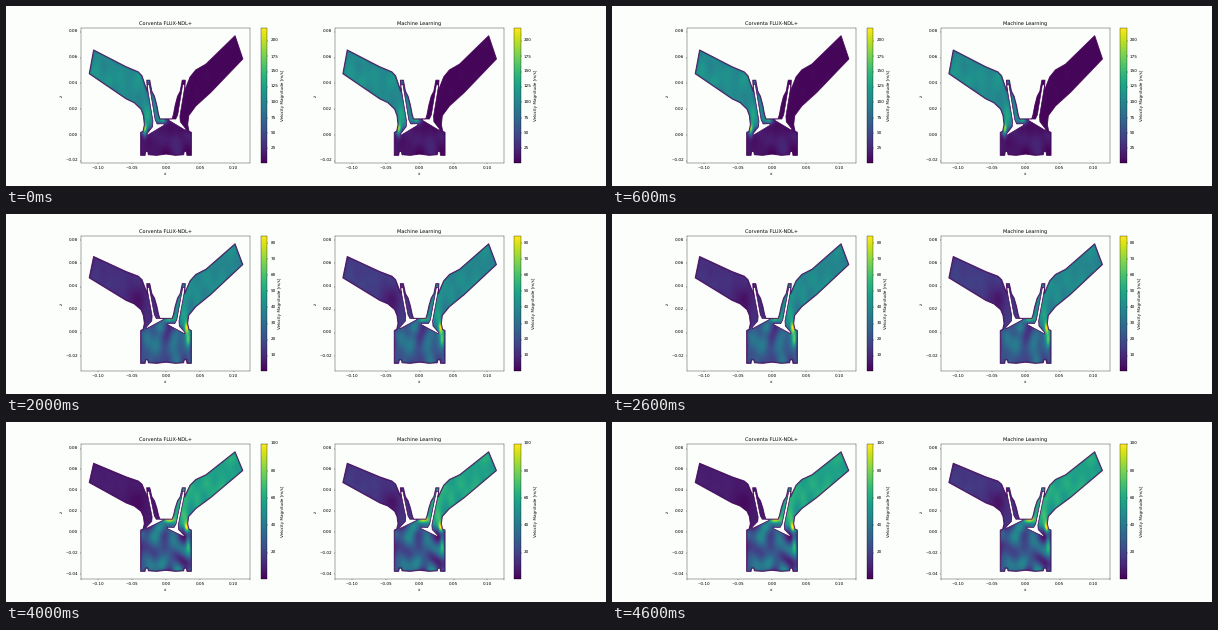
Write a matplotlib script that moves like this. It is 600 px wide and 180 px high and loops after 5 s.

```python
import numpy as np
import matplotlib.pyplot as plt
from matplotlib.animation import FuncAnimation
from matplotlib.cm import ScalarMappable
from matplotlib.colors import Normalize
from matplotlib.patches import Polygon

plt.rcParams["text.hinting"] = "none"

PAPER = "#fcfefc"
WALL = plt.get_cmap("viridis")(0.01)
PX = 2.4  # points per pixel at 30 dpi

# Lengths are in millimetres.
PEAK_SPEED = 221.5, 80.8, 84.7, 95.7, 100.2
FLOOR = -15.8, -20.7, -26.4, -31.9, -37.5
TOP = 77
TILT = np.radians(17.5)
HEAD = np.array([16.5, 7.5])  # centre of a closed valve
RADIUS = 13

# Right half of the engine, from the roof around the guide to the seat.
GUIDE = [(9, 12.5), (11, 16), (13.5, 23), (17, 30), (21, 34), (24, 42.5),
         (28.5, 42.5), (27.5, 34), (31, 39)]
SEAT = [(33.5, 15), (32, 8), (34, 3), (37.5, 2)]
RIGHT_DUCT = [(35.5, 45), (44, 50.5), (59, 55), (102, TOP), (113.5, 59),
              (66, 33), (44, 22.5)]
LEFT_DUCT = [(35.5, 46), (41, 49), (59, 53), (107, 66), (113.5, 47.5),
             (59, 28), (47, 25), (37, 20)]
CROWN = [(37.5, 0), (31, 0), (30, 3), (27, 3), (26, 0.5), (14, 0), (0, 1)]
HALF_VALVE = [(RADIUS, 0), (RADIUS, 1.2), (3.5, 4), (1.7, 8), (1.7, 33)]

X, Y = np.meshgrid(np.linspace(-125, 125, 500), np.linspace(-50, 90, 420))


def flip(points):
    return [(-x, y) for x, y in points]


def outline(floor):
    crown = [(x, y + floor) for x, y in CROWN]
    right = GUIDE + RIGHT_DUCT + SEAT + crown
    left = GUIDE + LEFT_DUCT + SEAT + crown[:-1]
    return np.array(right + flip(left)[::-1]) / 1000


def valve(side, lift):
    """Valve with its stem leaning outwards; side is -1 or 1."""
    s, t = np.array(HALF_VALVE + flip(HALF_VALVE)[::-1]).T
    t = t - lift * (t < 30)
    x = HEAD[0] + s * np.cos(TILT) + t * np.sin(TILT)
    y = HEAD[1] - s * np.sin(TILT) + t * np.cos(TILT)
    return np.column_stack([side * x, y]) / 1000


def sigmoid(z):
    return 1 / (1 + np.exp(-np.clip(z, -40, 40)))


def blob(x, y, w, h):
    return np.exp(-((X - x) / w) ** 2 - ((Y - y) / h) ** 2)


def waves(seed):
    rng = np.random.default_rng(seed)
    total = np.zeros_like(X)
    for angle in rng.uniform(0, 2 * np.pi, 8):
        k, p, q = rng.uniform((0.12, 0, 0), (0.3, 6.3, 6.3))
        u = X * np.cos(angle) + Y * np.sin(angle)
        v = Y * np.cos(angle) - X * np.sin(angle)
        total += np.sin(k * u + p + np.sin(0.15 * v + q))
    return total / 2


def speed(i, learned):
    """Exhaust through the left valve first, then intake through the right."""
    intake = i > 0
    side = 1 if intake else -1
    flowing = 0.36 + 0.06 * i if intake else 0.48
    idle = 0.2 - 0.03 * i + 0.02 * i * learned if intake else 0.02
    bowl = 0.29 if intake else 0.06

    port = sigmoid((Y - 13 + abs(X) / 3) / 1.2) * sigmoid((abs(X) - 6) / 1.5)
    v = np.where(side * X > 0, flowing, idle) * (1 + 0.06 * waves(9)) * port
    v += bowl * (1 + 0.3 * waves(i + 3)) * (1 - port)

    # Jets leave the gap at both rims of the open valve.
    reach = RADIUS * np.cos(TILT)
    drop = RADIUS * np.sin(TILT)
    v += 0.55 * blob(side * (HEAD[0] - reach), HEAD[1] + drop, 5 + i / 2, 3)
    v += 0.5 * blob(side * (HEAD[0] + reach + 2), HEAD[1] - drop, 3, 5)
    v += 0.12 * blob(side * 27, 15, 5, 7)
    if intake:
        v += 0.32 * blob(33, -3 - 2 * i, 3, 4 + i)
        v += 0.15 * blob(-8, 4, 7, 5)
        v -= 0.6 * idle * blob(-42, 28, 15, 14)
    else:
        v -= 0.2 * blob(-24, 34, 5, 9)
    return np.clip(v, 0.01, 1) * PEAK_SPEED[i]


class Panel:
    def __init__(self, ax, title, learned):
        self.ax, self.learned = ax, learned
        ax.set(title=title, xlabel="x", ylabel="z", facecolor=PAPER)
        self.norm = Normalize(0.2, 100)
        self.image = ax.imshow(X, origin="lower", aspect="auto", norm=self.norm,
                               extent=(-0.125, 0.125, -0.05, 0.09), zorder=1)
        fig.colorbar(ScalarMappable(self.norm, "viridis"), ax=ax,
                     label="Velocity Magnitude [m/s]")
        self.shade = self.add(2, fc="none", ec=WALL, lw=2.5 * PX, alpha=0.2)
        self.valves = [self.add(3, fc=PAPER, ec=WALL, lw=0.7 * PX) for _ in range(2)]
        self.edge = self.add(4, fc="none", ec=WALL, lw=PX, alpha=0.85)

    def add(self, z, **style):
        return self.ax.add_patch(Polygon([(0, 0), (0, 1), (1, 0)], zorder=z,
                                         joinstyle="round", **style))

    def show(self, i):
        shape = outline(FLOOR[i])
        self.edge.set_xy(shape)
        self.shade.set_xy(shape)
        lifts = (0, 1 + 1.8 * i) if i else (4, 0)
        for patch, side, lift in zip(self.valves, (-1, 1), lifts):
            patch.set_xy(valve(side, lift))
        for artist in (self.image, self.shade, *self.valves):
            artist.set_clip_path(self.edge)
        self.image.set_data(speed(i, self.learned))
        self.norm.vmax = PEAK_SPEED[i]
        margin = 0.068 * (TOP - FLOOR[i])
        self.ax.set_xlim(-0.1256, 0.1242)
        self.ax.set_ylim((FLOOR[i] - margin) / 1000, (TOP + margin) / 1000)


fig, axes = plt.subplots(1, 2, figsize=(20, 6), dpi=30, facecolor=PAPER,
                         gridspec_kw=dict(bottom=0.125, top=0.88))
panels = [Panel(axes[0], "Corventa FLUX-NDL+", False),
          Panel(axes[1], "Machine Learning", True)]


def update(i):
    for panel in panels:
        panel.show(i)


anim = FuncAnimation(fig, update, frames=len(FLOOR), interval=1000,
                     init_func=lambda: update(0), repeat=True, repeat_delay=0)
plt.show()
```
